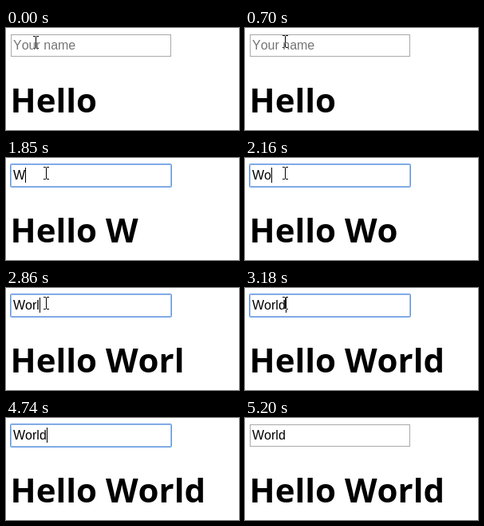
Animation of 292 by 128 pixels, one loop 5350 ms. Source, as an HTML page:

```html
<!DOCTYPE html>
<html lang="en">
<head>
<meta charset="utf-8">
<title>Hello input</title>
<style>
  html, body { margin: 0; width: 100%; height: 100%; overflow: hidden; background: #fff; }
  svg { display: block; width: 292px; height: 128px; isolation: isolate; }
  .field { font: 16px Arial, "Liberation Sans", sans-serif; font-kerning: none; }
  .heading { font: 700 42px "Open Sans", "Noto Sans", sans-serif; font-kerning: none; }
  .crisp { shape-rendering: crispEdges; }
  #beam { mix-blend-mode: difference; }
</style>
</head>
<body>
<svg viewBox="0 0 292 128">
  <rect width="292" height="128" fill="#fff"/>
  <rect id="border" x="6.5" y="8.5" width="200" height="27" fill="none" stroke="#a9a9a9"/>
  <g id="ring" fill="none">
    <rect x="6.5" y="8.5" width="200" height="27" stroke="#a3bde4"/>
    <rect x="5.5" y="7.5" width="202" height="29" rx="1" stroke="#5e98e8"/>
  </g>
  <text id="value" class="field" x="9" y="27"></text>
  <rect id="caret" class="crisp" width="1" height="19"/>
  <text id="heading" class="heading" x="5.5" y="105.5"></text>
  <path id="beam" class="crisp" fill="#fff" d="M0 0h3v1h-3zM4 0h3v1h-3zM3 1h1v14h-1zM0 15h3v1h-3zM4 15h3v1h-3z"/>
  <path id="arrow" fill="#fff" stroke="#000" d="M.5.5V16.5L4.3 12.9 6.8 18.5 9.2 17.5 6.8 12H11.5Z"/>
</svg>
<script>
const LOOP = 5350;
const FOCUS = 930, BLUR = 5200;
const WORD = 'World';
const keyTimes = [1850, 2160, 2560, 2860, 3180];
const caretOn = [[FOCUS, 1390], [1850, 3730], [4280, BLUR]];

// [time, shape, left, top]
const pointer = [
  [0, 'beam', 34, 10],
  [70, 'arrow', 19, 3],
  [90, 'none'],
  [400, 'arrow', 26, 1],
  [475, 'beam', 35, 6],
  [550, 'beam', 42, 8],
  [625, 'beam', 46, 9],
  [700, 'beam', 47, 9],
  [1160, 'beam', 47, 10],
  [1240, 'beam', 47, 11],
  [4430, 'beam', 67, 19],
  [4510, 'arrow', 103, 51],
  [4590, 'beam', 143, 80],
  [4665, 'arrow', 188, 116],
  [4740, 'none']
];

const $ = id => document.getElementById(id);
const [border, ring, value, caret, heading, beam, arrow] =
  ['border', 'ring', 'value', 'caret', 'heading', 'beam', 'arrow'].map($);
const show = (el, on) => el.setAttribute('visibility', on ? 'visible' : 'hidden');

function draw(t) {
  const focused = t >= FOCUS && t < BLUR;
  const typed = WORD.slice(0, keyTimes.filter(k => t >= k).length);
  show(border, !focused);
  show(ring, focused);

  value.textContent = typed || 'Your name';
  value.setAttribute('fill', typed ? '#000' : '#757575');
  heading.textContent = 'Hello ' + typed;

  const typedWidth = typed ? value.getComputedTextLength() : 0;
  caret.setAttribute('x', Math.round(9 + typedWidth));
  caret.setAttribute('y', typed ? 12 : 13);
  show(caret, caretOn.some(([from, to]) => t >= from && t < to));

  const [, shape, x, y] = pointer.filter(p => t >= p[0]).pop();
  for (const el of [beam, arrow]) {
    show(el, el.id === shape);
    if (el.id === shape) el.setAttribute('transform', `translate(${x} ${y})`);
  }
}

const start = performance.now();
function tick() {
  draw((performance.now() - start) % LOOP);
  requestAnimationFrame(tick);
}
tick();
</script>
</body>
</html>
```
